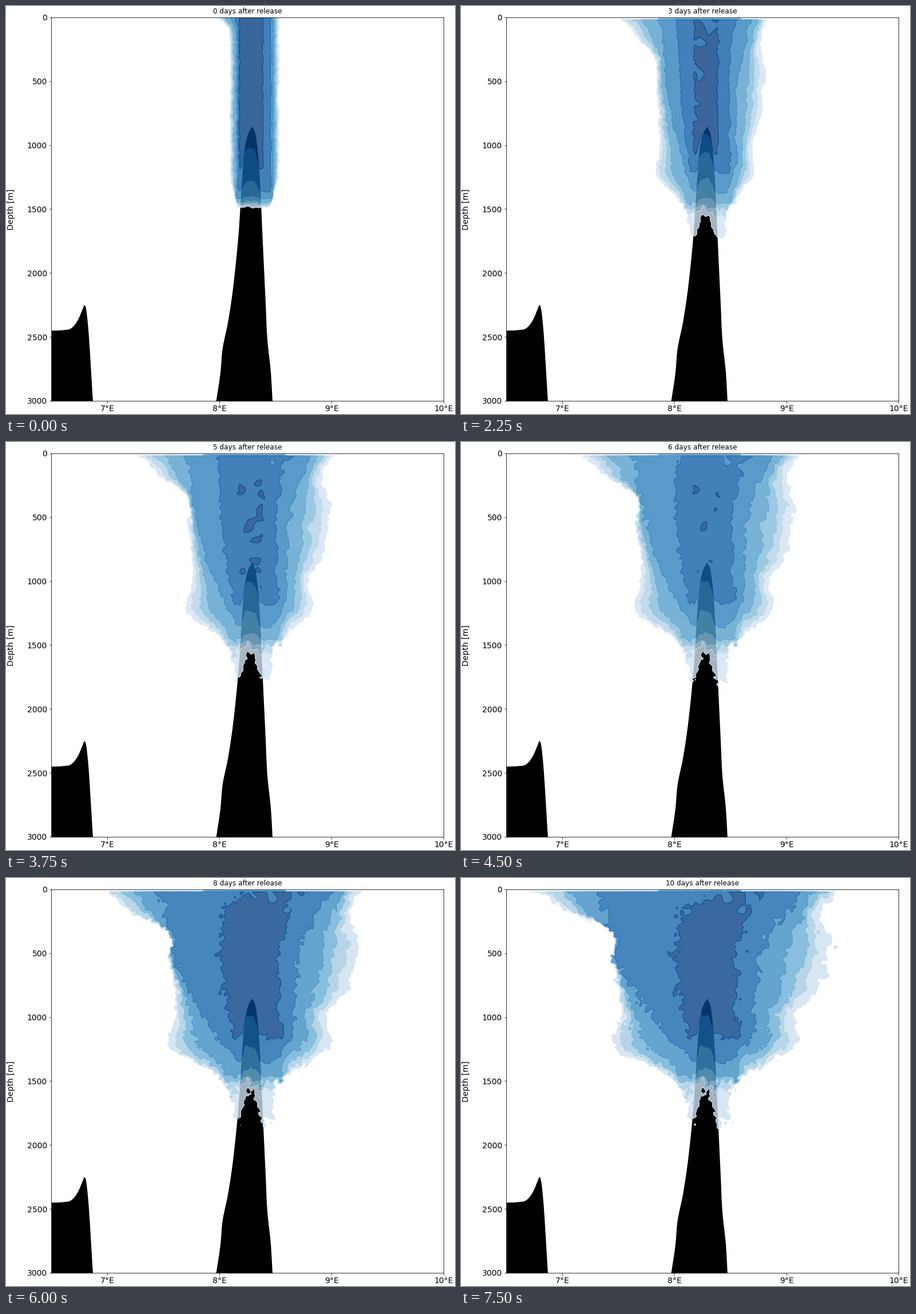
A matplotlib script that plays this animation: 785 by 714 pixels, repeating every 8 s.

```python
import numpy as np
import matplotlib.pyplot as plt
from matplotlib.animation import FuncAnimation

W, H, DPI = 785, 714, 64
PT = 72 / DPI                       # points per pixel
STEP_MS, FRAMES, PER_DAY, DAYS = 250, 32, 3, 11
LEFT, RIGHT, TOP, BOTTOM = 79, 765, 20, 691
SURFACE = 23


def curve(points, t):
    """Smooth curve through (t, value) key points, flat beyond the ends."""
    ts, vs = np.array(points, float).T
    slope = np.gradient(vs, ts)
    t = np.clip(t, ts[0], ts[-1])
    i = np.clip(np.searchsorted(ts, t) - 1, 0, len(ts) - 2)
    h = ts[i + 1] - ts[i]
    s = (t - ts[i]) / h
    return ((1 + 2 * s) * (1 - s) ** 2 * vs[i] + s * (1 - s) ** 2 * h * slope[i]
            + s * s * (3 - 2 * s) * vs[i + 1] + s * s * (s - 1) * h * slope[i + 1])


# Land outlines: x by height for the seamount, height by x for the ridge
WEST_FLANK = [(210, 429.5), (219, 424), (235, 419), (262, 415), (300, 412),
              (405, 405), (457, 400), (508, 394), (553, 387), (600, 377.5),
              (640, 374), (691, 366.5)]
EAST_FLANK = [(210, 429.5), (219, 434), (235, 437), (262, 440), (305, 443),
              (392, 447), (520, 453), (583, 456), (640, 462), (691, 465)]
RIDGE = [(79, 567), (100, 566), (113, 563), (125, 548), (133, 529.5),
         (136, 522.5), (139, 529), (142, 554), (151, 691)]

# How far the plume edges travel in ten days, by height
WEST_REACH = [(23, 247), (62, 200), (80, 152), (150, 126), (250, 114),
              (298, 127), (335, 55), (395, 7)]
EAST_REACH = [(23, 184), (50, 155), (80, 154), (112, 176), (150, 162),
              (190, 154), (245, 103), (295, 110), (335, 50), (355, 13)]
EAST_MID_REACH = [(23, 133), (78, 90), (120, 62), (220, 48), (285, 36),
                  (318, -8)]
# Lower limit of levels 1 to 7, at release and late
LOBE = [352, 350, 348, 345, 338, 325, 285], [425, 373, 358, 346, 322, 278, 250]
SADDLE = [352, 350, 346, 342, 334, 308, 248], [372, 362, 353, 337, 290, 236, 215]

xs = np.arange(110, 678, 2.0)
ys = np.arange(20.5, 452, 2.0)
X, Y = np.meshgrid(xs, ys)
rng = np.random.default_rng(8)


def noise(scale):
    """Smooth random field with unit spread; scale in grid cells."""
    fy = np.fft.fftfreq(X.shape[0])[:, None]
    fx = np.fft.fftfreq(X.shape[1])[None, :]
    blur = np.exp(-2 * (np.pi * scale) ** 2 * (fx ** 2 + fy ** 2))
    n = np.fft.ifft2(np.fft.fft2(rng.normal(size=X.shape)) * blur).real
    return (n - n.mean()) / n.std()


fine_x, fine_y, wide_x, wide_y = noise(1.1), noise(1.1), noise(3.5), noise(3.5)
grain, patch = noise(1.3), noise(3)


def west_edges(y, day):
    """Outer, middle, core and innermost edges west of the vent."""
    g = day / 10
    deep = np.clip((y - SURFACE) / 295, 0, 1)
    flare = np.exp(-np.maximum(y - SURFACE, 0) / 10)
    taper = 12 * np.clip((y - 305) / 45, 0, 1)
    outer = 393 + taper - 20 * flare - g ** 0.77 * curve(WEST_REACH, y)
    mid = 403 - 10 * flare - 160 * g ** 0.95 * (1 - deep ** 2)
    core = 406 - 5 * flare - 33 * min(day / 4, 1) ** 0.8 * (1 - deep ** 2)
    late = max(day - 5, 0) / 5
    core = core + 100 * late * np.exp(-np.maximum(y - SURFACE, 0) / 25)
    return outer, mid, core, np.maximum(408, core + 2)


def east_edges(y, day):
    g = day / 10
    near_top = np.exp(-np.maximum(y - SURFACE, 0) / 30)
    taper = 18 * np.clip((y - 300) / 60, 0, 1)
    outer = 476 - taper + g ** 0.95 * curve(EAST_REACH, y)
    mid = 467 + g * curve(EAST_MID_REACH, y)
    core = 463 + g * (20 + 52 * near_top)
    return outer, mid, core, np.minimum(449, core - 2)


def bounds(outer, mid, core, inner, shares):
    between = [outer + s * (mid - outer) for s in shares]
    return np.maximum.accumulate([outer, *between, mid, core, inner])


def ramp(t, limits):
    """Level number at t, rising by one at each limit."""
    v = 1 + np.clip((t - limits[0]) / 8, -3, 0)
    for lo, hi in zip(limits, limits[1:]):
        v = v + np.clip((t - lo) / np.maximum(hi - lo, 1), 0, 1)
    return v + np.clip((t - limits[-1]) / 6, 0, 1)


def settle(pair, day):
    start, end = np.array(pair)
    return start + (end - start) * (1 - np.exp(-day / 2.5))


def field(day):
    # The edges get rougher with time, to the east and at the foot
    rough = day * np.interp(X, [400, 480], [0.1, 0.4])
    foot = 1 + min(day, 2) * np.clip((Y - 340) / 20, 0, 1)
    x = X + (0.6 + 0.14 * day) * fine_x + rough * wide_x
    y = Y + (0.8 + 0.14 * day) * foot * fine_y + 0.7 * rough * wide_y
    west = bounds(*west_edges(y, day), (0.15, 0.35, 0.55))
    east = bounds(*(-e for e in east_edges(y, day)), (0.22, 0.4, 0.62))
    over = np.exp(-((X - 427) / 13) ** 4)
    floor = [a + (b - a) * over
             for a, b in zip(settle(LOBE, day), settle(SADDLE, day))]
    f = np.minimum(ramp(x, west), ramp(-x, east))
    f = np.minimum(f, ramp(-y, [-b for b in floor])) + 0.009 * day * grain
    # The strongest level thins out into patches
    if day > 2:
        cap = 6.45 + 2.4 * np.exp(-day / 2.9)
        cap = cap - 0.4 * np.clip((75 - Y) / 40, 0, 1)
        f = np.minimum(f, cap + 0.2 * patch)
    if day:
        strip = np.where((X > 344) & (X < 490), np.minimum(f, 3.4), 0)
        f = np.where(Y < SURFACE, strip, f)
    return f


fields = [field(d) for d in range(DAYS)]

fig = plt.figure(figsize=(W / DPI, H / DPI), dpi=DPI, facecolor="white")
ax = fig.add_axes([LEFT / W, 1 - BOTTOM / H,
                   (RIGHT - LEFT) / W, (BOTTOM - TOP) / H])
ax.set_xlim(LEFT, RIGHT)
ax.set_ylim(BOTTOM, TOP)
ax.set_autoscale_on(False)
ax.set_xticks([177 + 196 * i for i in range(4)],
              [f"{d}°E" for d in range(7, 11)])
ax.set_yticks(np.linspace(TOP, BOTTOM, 7), [str(500 * i) for i in range(7)])
ax.tick_params(labelsize=14 * PT, length=3.5 * PT, pad=3.5 * PT,
               width=0.8 * PT)
for spine in ax.spines.values():
    spine.set_linewidth(0.8 * PT)
fig.text(9 / W, 1 - 355.5 / H, "Depth [m]", rotation=90, ha="center",
         va="center", fontsize=14 * PT)

heights = np.arange(210, 691.5, 0.5)
ax.fill_betweenx(heights + 0.5, curve(WEST_FLANK, heights) + 0.5,
                 curve(EAST_FLANK, heights) + 0.5, color="black", lw=0, zorder=1)
across = np.arange(79, 151.5, 0.5)
ax.fill_between(across + 0.5, curve(RIDGE, across) + 0.5, BOTTOM,
                color="black", lw=0, zorder=1)

title = ax.text(422.5, 13, "", ha="center", va="baseline", fontsize=12 * PT,
                zorder=5, bbox=dict(facecolor="white", edgecolor="none",
                                    pad=4 * PT))
blues = plt.get_cmap("Blues")
drawn = []


def update(frame):
    day = frame // PER_DAY
    while drawn:
        drawn.pop().remove()
    # Once the top level is gone, the colours spread over one level less
    n = 8 if day < 8 else 7
    levels = list(range(1, n)) + [20]
    fills = [blues((k + 0.5) / n) for k in range(1, n)]
    lines = [blues(k / n) for k in range(1, n)]
    drawn.append(ax.contourf(xs, ys, fields[day], levels, colors=fills,
                             alpha=0.8, zorder=2))
    drawn.append(ax.contour(xs, ys, fields[day], levels[:-1], colors=lines,
                            alpha=0.8, linewidths=0.8 * PT, zorder=2.2))
    title.set_text(f"{day} days after release")
    return []


anim = FuncAnimation(fig, update, frames=FRAMES, interval=STEP_MS,
                     repeat=True, repeat_delay=0)
plt.show()
```
